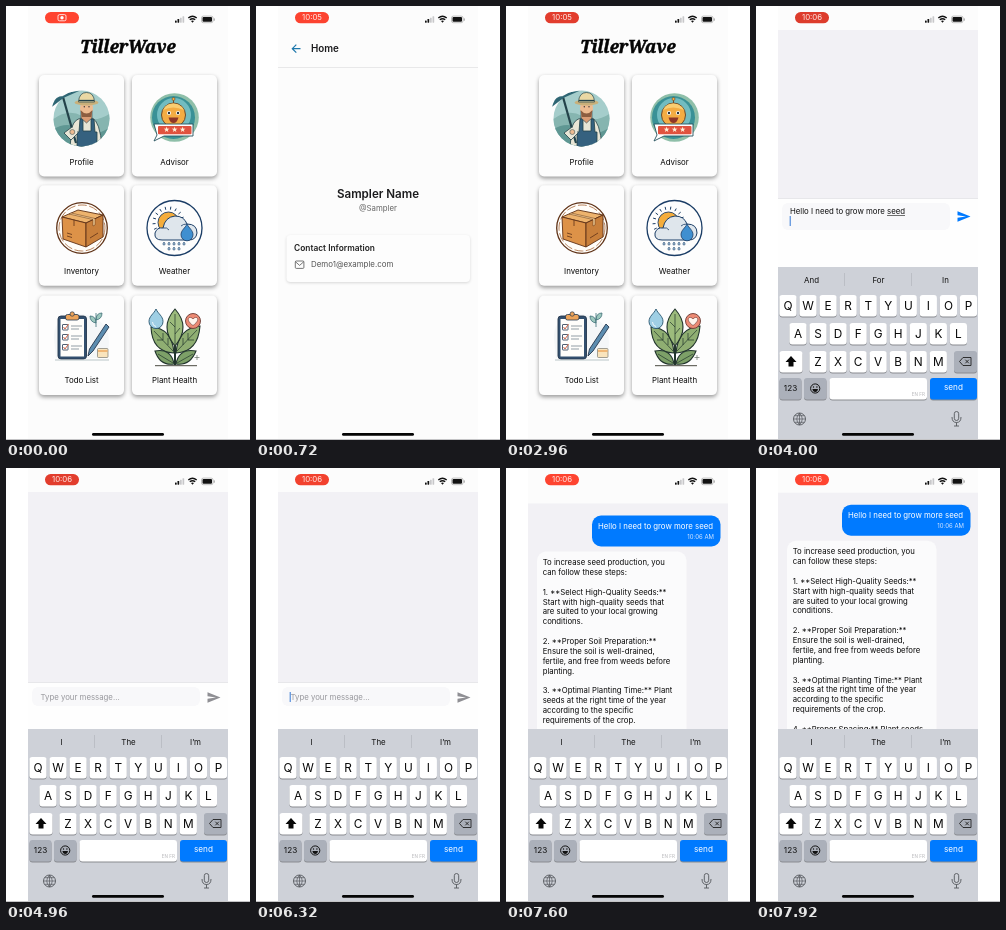
Recreate the animation shown at these times as an HTML page with a canvas. Size 244 by 434 pixels, loop 8 s.

```html
<!DOCTYPE html>
<html lang="en">
<head>
<meta charset="utf-8">
<title>Farm app demo</title>
<style>
html, body { margin: 0; width: 100%; height: 100%; overflow: hidden; background: #fff; }
canvas { display: block; width: 100vw; height: 100vh; }
</style>
</head>
<body>
<canvas id="stage"></canvas>
<script>
const W = 244, H = 434, LOOP = 8000;
const canvas = document.getElementById('stage');
const g = canvas.getContext('2d');
const SANS = 'Inter, Roboto, sans-serif';
const BLUE = '#007aff', NAVY = '#1b3d66', INK = '#22352d', DARK = '#23424a';

// Screen changes in ms
const T = { profile: 480, avatar: 960, back: 2160, press: 3440, chat: 3600, keys: 3680,
  type: 3800, typed: 3980, sent: 4720, reply: 7200, scroll: 7600, scrolled: 7920 };

const clamp = v => Math.max(0, Math.min(1, v));
const span = (t, a, b) => clamp((t - a) / (b - a));
const ease = v => v * v * (3 - 2 * v);

function paint(p, fill, stroke, lw = 1) {
  if (fill) { g.fillStyle = fill; g.fill(p); }
  if (stroke) { g.strokeStyle = stroke; g.lineWidth = lw; g.stroke(p); }
}
const path = (d, fill, stroke, lw) => paint(new Path2D(d), fill, stroke, lw);
function rect(x, y, w, h, fill) { g.fillStyle = fill; g.fillRect(x, y, w, h); }
function box(x, y, w, h, r, fill, stroke, lw) {
  const p = new Path2D();
  p.roundRect(x, y, w, h, r);
  paint(p, fill, stroke, lw);
}
function disc(x, y, r, fill, stroke, lw) {
  const p = new Path2D();
  p.arc(x, y, r, 0, 7);
  paint(p, fill, stroke, lw);
}
function oval(x, y, rx, ry, fill) {
  const p = new Path2D();
  p.ellipse(x, y, rx, ry, 0, 0, 7);
  paint(p, fill);
}
function text(s, x, y, size, color = '#111', align = 'left', weight = 400, family = SANS) {
  g.font = `${weight} ${size}px ${family}`;
  g.fillStyle = color;
  g.textAlign = align;
  g.textBaseline = 'middle';
  g.fillText(s, x, y);
}
function shadowed(blur, dy, color, draw) {
  g.save();
  const k = g.getTransform().a;
  g.shadowBlur = blur * k;
  g.shadowOffsetY = dy * k;
  g.shadowColor = color;
  draw();
  g.restore();
}

function statusBar(t) {
  const glow = 0.5 + 0.5 * Math.cos(t / LOOP * 2 * Math.PI);
  const mix = (a, b) => Math.round(a + (b - a) * glow);
  box(39, 6, 34, 11.3, 5.6, `rgb(${mix(221, 255)},${mix(60, 68)},${mix(44, 48)})`);
  if (t < T.profile) {
    box(52, 8.6, 8, 6.2, 1.5, null, '#fff', 0.8);
    disc(56, 11.7, 1.7, '#fff');
  } else {
    text(t < T.chat ? '10:05' : '10:06', 56, 12, 7.8, '#ffe9e4', 'center');
  }
  for (let i = 0; i < 4; i++) {
    box(169 + i * 2.5, 14.5 - i * 1.4, 1.7, 2.2 + i * 1.4, 0.4, i < 2 ? '#111' : '#c8c8ca');
  }
  path('M182.3 12Q186.5 8.3 190.7 12M183.8 13.8Q186.5 11.5 189.2 13.8', null, '#111', 1.4);
  path('M185 15.1Q186.5 14 188 15.1L186.5 16.7Z', '#111');
  box(195.5, 10.1, 11.5, 6.6, 1.8, null, '#999', 0.6);
  box(196.5, 11, 9.5, 4.8, 1, '#111');
  box(207.7, 12.2, 1, 2.5, 0.5, '#999');
}

function farmer() {
  g.save();
  const clip = new Path2D();
  clip.arc(75.5, 112.5, 28, 0, 7);
  g.clip(clip);
  rect(46, 83, 60, 60, '#a5cdcb');
  path('M46 114Q62 102 76 110T106 106V142H46Z', '#86b5b0');
  path('M46 124Q62 114 74 124T106 120V142H46Z', '#5f9793');
  path('M64 141L66 121Q69 112 77 112H86Q94 115 96 141Z', '#e9e6d6', DARK, 0.8);
  path('M71 141V126H73L74 113H77V125H85V113H88L89 126H91V141Z', '#35617f', DARK, 0.8);
  path('M75 105H86V112L80.5 117L75 112Z', '#d99b74', DARK, 0.6);
  oval(80.5, 102, 6.5, 7.5, '#edbb91');
  path('M74.5 104Q80.5 111 86.5 104L85 111H76Z', '#8d5d40');
  disc(78.3, 100.7, 0.7, '#333');
  disc(83, 100.7, 0.7, '#333');
  g.restore();
  oval(80.5, 96.5, 12, 3, '#c9b07a');
  path('M72.5 96Q73 86.5 80.5 86.5T88.5 96Z', '#ead8a4', DARK, 0.7);
  path('M72.8 94.5H88.2', null, DARK, 1.3);
  path('M57 91L70 137', null, DARK, 2.2);
  path('M48 98Q50 91 57 91L66 87Q60 88 48 98Z', '#2f6674', '#2f6674', 2);
  path('M66 121L58 127L65 134L72 127', '#e9e6d6', DARK, 0.8);
  disc(66.3, 126, 2.5, '#edbb91', DARK, 0.5);
}

function advisor() {
  disc(168.5, 111.5, 24.3, '#8fbfa9');
  disc(167.5, 111.5, 21.5, '#3a9196');
  disc(168, 109, 17, '#72bcc0');
  disc(167.5, 109, 12, '#f3ac43', '#6b4a2a', 1);
  path('M157 104Q160 97 167.5 97.5T178 104Q167 99 157 104', '#f9cd72');
  path('M167.5 97V93.5', null, '#6b4a2a', 1);
  disc(167.5, 93, 1.5, '#f3ac43', '#6b4a2a', 0.6);
  for (const x of [163, 172]) {
    disc(x, 107, 2, '#fff');
    disc(x, 107, 1.2, '#24333c');
  }
  path('M162.5 111.5H172.5Q171 117 167.5 117T162.5 111.5', '#8f3727');
  path('M148 118H187V130H158L148 135L151 129Z', '#fff', '#27535e', 0.9);
  box(152, 120, 33.5, 8.3, 1, '#e0523f');
  for (let i = 0; i < 3; i++) text('★', 160.5 + i * 8, 124.2, 7.5, '#fff3dc', 'center', 400, 'DejaVu Sans, sans-serif');
}

function parcel() {
  const edge = '#5f3217';
  disc(76, 222, 25.3, '#fffdf9', edge, 1.3);
  g.setLineDash([9, 2.5]);
  disc(76, 222, 23, null, '#a8673a', 0.8);
  g.setLineDash([]);
  path('M56 211L72 204L97 209L80 217Z', '#edb36d', edge, 0.9);
  path('M56 211L80 217V241L57 233Z', '#dd9248', edge, 0.9);
  path('M80 217L97 209V231L80 241Z', '#c87f3b', edge, 0.9);
  path('M65 207L89 212.5V219L87 220V213.5L63 208Z', '#f6cf95', edge, 0.5);
  path('M61 227L66 228.5M61 230L66 231.5M84 232L92 227M68 214V220', null, edge, 0.8);
}

function drop(x, y, s, fill, stroke, lw = 0.8) {
  path(`M${x} ${y}C${x + s * 0.3} ${y + s * 0.7} ${x + s} ${y + s} ${x + s} ${y + s * 1.8}A${s} ${s} 0 0 1 ${x - s} ${y + s * 1.8}C${x - s} ${y + s} ${x - s * 0.3} ${y + s * 0.7} ${x} ${y}Z`, fill, stroke, lw);
}

function weather() {
  disc(168.5, 222, 27.5, '#fdfdfd', NAVY, 1.3);
  for (let i = 0; i < 10; i++) {
    const a = 2.7 + i * 0.36, c = Math.cos(a), s = Math.sin(a);
    path(`M${162.5 + c * 13} ${216.5 + s * 13}L${162.5 + c * 16} ${216.5 + s * 16}`, null, NAVY, 1);
  }
  disc(162.5, 216.5, 10.5, '#f5ad3c', NAVY, 0.9);
  path('M156 234Q148 234 149 227Q151 221 157 222Q159 211 169 210Q178 210 181 218Q191 218 191 227Q190 234 183 234Z', '#dfe6ec', NAVY, 1);
  path('M157 222Q161 221 163 224M181 218Q177 218 175 220', null, NAVY, 0.8);
  drop(181, 218, 6, '#3f8fd0', NAVY);
  for (let i = 0; i < 8; i++) drop(158 + (i % 5) * 5 + (i > 4 ? 5 : 0), i > 4 ? 241 : 236, 1.1, '#a9cbe4', NAVY, 0.6);
}

function todo() {
  const navy = '#26384f';
  path('M48 333Q47 315 64 309Q87 304 101 323Q106 342 98 352H50Z', '#f5f7f8');
  box(52, 310, 28.5, 43, 3, '#33506f', navy, 0.9);
  rect(54.5, 313, 23.5, 37.5, '#fffefb');
  box(59.5, 308.5, 13.5, 5.5, 2, '#eda45a', navy, 0.8);
  disc(66.2, 308, 2.2, '#eda45a', navy, 0.7);
  for (let i = 0; i < 3; i++) {
    const y = 318.5 + i * 10;
    box(56.5, y, 5.5, 5.5, 0.5, '#fff', navy, 0.8);
    path(`M57.5 ${y + 2.5}L59 ${y + 4.5}L62.5 ${y - 0.5}`, null, '#cd684a', 1);
    path(`M65 ${y + 1.5}H76M65 ${y + 4.5}H73`, null, '#66747f', 0.7);
  }
  path('M100 318L103 321L87 345L82 350L83.5 343Z', '#5c8db0', navy, 0.9);
  path('M90 321V307M90 317Q84 316 84 310Q90 310 90 317M90 314Q96 313 96 307Q90 307 90 314', '#9cc7bd', '#3e6f78', 0.8);
  box(91.5, 342.5, 10.5, 9, 1, '#f9e4bd', '#7d7b72', 0.7);
  path('M92 345H101.5', null, '#eda45a', 1.4);
  path('M49 354H103', null, '#9cacaf', 0.7);
}

function leaf(d, vein, fill) {
  path(d, fill, INK, 1.1);
  path(vein, null, INK, 0.7);
}

function plant() {
  path('M169 359V323', null, INK, 2);
  leaf('M168 347Q146 346 145 321Q166 322 168 347', 'M148 325L167 345M157 334V327M162 339V332M157 334H151', '#8fae72');
  leaf('M170 347Q192 346 194 320Q172 322 170 347', 'M191 324L171 345M182 334V327M177 339V332M182 334H188', '#8fae72');
  leaf('M169 340Q153 321 169 303Q185 321 169 340', 'M169 308V339M169 321L164 316M169 328L174 322', '#9cbb7c');
  leaf('M168 358Q154 360 149 345Q165 342 168 358', 'M152 348L167 357', '#7da068');
  leaf('M170 358Q184 360 190 345Q173 342 170 358', 'M187 348L171 357', '#7da068');
  path('M149 359.7H191', null, '#4b4a40', 1);
  drop(150, 303, 7, '#9fcfe4', '#2a5670', 0.9);
  path('M146.5 316Q146.5 320 150 320.5', null, '#fff', 0.8);
  disc(187, 315, 7.5, '#ec8a74', '#6b3a34', 0.9);
  path('M187 319.5C178 313 184 309 187 313C190 309 196 313 187 319.5Z', '#fff4ec', '#6b3a34', 0.6);
  path('M191 349V354M188.5 351.5H193.5', null, '#667066', 0.7);
}

const CARDS = [['Profile', farmer], ['Advisor', advisor], ['Inventory', parcel],
  ['Weather', weather], ['Todo List', todo], ['Plant Health', plant]];

function title(s) {
  text(s, 122, 42, 17.2, '#050505', 'center', 'italic 900', '"Noto Serif", serif');
  g.strokeStyle = '#050505';
  g.lineWidth = 0.5;
  g.strokeText(s, 122, 42);
}

function home(t) {
  title('TillerWave');
  CARDS.forEach(([label, icon], i) => {
    const x = 33 + (i % 2) * 93, row = i >> 1, y = 69 + row * 110.3;
    const pressed = t >= T.press && i === 1 || t >= T.profile - 160 && t < T.profile && i === 0;
    g.globalAlpha = pressed ? 0.45 : 1;
    shadowed(4, 2, 'rgba(0,0,0,.4)', () => box(x, y, 85, 101.5 - row, 5, '#fdfdfd'));
    icon();
    text(label, x + 42.5, 156.5 + row * 109, 7.9, '#080808', 'center');
    g.globalAlpha = 1;
  });
}

function profile(t) {
  path('M44.5 42.7H36.5M40.3 38.7L36.3 42.7L40.3 46.7', null, '#1e78ac', 1.2);
  text('Home', 55, 43, 9.8, '#1c1c1e', 'left', 600);
  rect(22, 61, 200, 0.8, '#e4e4e5');
  if (t >= T.avatar) {
    path('M88 155Q85 155 85.3 151Q88 127 107 120H137Q156 127 159 151Q159 155 156 155Z', '#7b797b');
    disc(122, 107, 24.5, '#fdfdfd');
    disc(122, 107, 21.3, '#7b797b');
  }
  text('Sampler Name', 122, 188.5, 11.6, '#1b1b1d', 'center', 600);
  text('@Sampler', 122, 203, 7.8, '#666', 'center');
  shadowed(3, 1, 'rgba(0,0,0,.15)', () => box(30.5, 229, 183.5, 47, 4, '#fdfdfd'));
  text('Contact Information', 38, 242.5, 8.4, '#222', 'left', 600);
  box(39.3, 255, 8.6, 7.4, 1, null, '#555', 0.8);
  path('M39.5 255.8L43.6 259.4L47.7 255.8', null, '#555', 0.8);
  text('Demo1@example.com', 55, 259, 7.9, '#555');
}

function key(x, y, w, fill = '#fff', h = 21.5) {
  box(x, y + 1, w, h, 3, '#898b90');
  box(x, y, w, h, 3, fill);
}

function keyboard(words) {
  rect(22, 261, 200, 175, '#ced1d8');
  words.forEach((w, i) => text(w, 55.5 + i * 67, 274.5, 7.9, '#111', 'center'));
  rect(88, 267, 0.7, 13, '#b3b6bd');
  rect(155, 267, 0.7, 13, '#b3b6bd');
  ['QWERTYUIOP', 'ASDFGHJKL', 'ZXCVBNM'].forEach((row, r) => {
    const x0 = [32, 42, 62][r], y = 289 + r * 28;
    [...row].forEach((c, i) => {
      const x = x0 + i * 20.05;
      key(x - 8.6, y, 17.2);
      text(c, x, y + 11, 11.8, '#080808', 'center');
    });
  });
  const grey = '#abb0ba';
  key(23.5, 345, 23);
  path('M35 350L40.5 356H37.5V360.5H32.5V356H29.5Z', '#080808');
  key(198, 345, 23, grey);
  path('M203.5 355.5L207 351.5H215V359.5H207ZM209.3 353.7L212.9 357.3M212.9 353.7L209.3 357.3', null, '#222', 0.9);
  key(23.5, 372, 22, grey);
  text('123', 34.5, 383, 8.2, '#111', 'center');
  key(48, 372, 22.5, grey);
  disc(59.2, 382.5, 4.6, null, '#111', 1);
  disc(57.5, 381, 0.7, '#111');
  disc(60.9, 381, 0.7, '#111');
  path('M56.4 383H62Q61.5 386 59.2 386T56.4 383', '#111');
  key(73.5, 372, 97.5);
  text('EN FR', 169, 389, 4.6, '#b5b5b8', 'right');
  key(174, 372, 47, BLUE);
  text('send', 197.5, 382, 8.2, '#fff', 'center');
  disc(43.5, 413, 6, null, '#55585d', 0.9);
  path('M43.5 407Q38 413 43.5 419Q49 413 43.5 407V419M37.5 413H49.5M38.7 409.7H48.3M38.7 416.3H48.3', null, '#55585d', 0.7);
  box(198.3, 405.5, 4.4, 9, 2.2, null, '#55585d', 0.9);
  path('M196 411Q196 416.5 200.5 416.5T205 411M200.5 416.5V420M198 420H203', null, '#55585d', 0.9);
}

const QUESTION = 'Hello I need to grow more seed';
const ANSWER = ['To increase seed production, you', 'can follow these steps:', '',
  '1. **Select High-Quality Seeds:**', 'Start with high-quality seeds that', 'are suited to your local growing', 'conditions.', '',
  '2. **Proper Soil Preparation:**', 'Ensure the soil is well-drained,', 'fertile, and free from weeds before', 'planting.', '',
  '3. **Optimal Planting Time:** Plant', 'seeds at the right time of the year', 'according to the specific', 'requirements of the crop.', '',
  '4. **Proper Spacing:** Plant seeds'];

// The whole list, backdrop included, is pulled down and springs back
function messages(t) {
  const dy = -10.8 * ease(span(t, T.scroll, T.scrolled));
  g.save();
  g.beginPath();
  g.rect(22, 24, 200, 237);
  g.clip();
  rect(22, 24, 200, 14, '#fcfcfc');
  g.translate(0, dy);
  rect(22, 35.5, 200, 240, '#f2f1f5');
  box(86, 47.5, 128.5, 31, 9, BLUE);
  text(QUESTION, 92, 58.5, 7.8, '#fff');
  text('10:06 AM', 208, 69.2, 6, '#d3e6ff', 'right');
  box(31, 83.5, 149.5, 240, 9, '#fbfbfc');
  ANSWER.forEach((s, i) => text(s, 36.7, 94.8 + i * 9.86, 7.75, '#080808'));
  g.restore();
}

function inputBar(t, lift) {
  const sent = t >= T.sent;
  const typed = sent ? '' : QUESTION.slice(0, Math.round(QUESTION.length * span(t, T.type, T.typed)));
  const done = typed === QUESTION;
  const top = done ? 192 : 214;
  g.save();
  g.translate(0, lift);
  rect(22, top, 200, 261 - top, '#fefefe');
  rect(22, top, 200, 0.7, '#dedee2');
  box(26, top + 5, 168, done ? 27 : 19, 6, '#f8f8fa');
  const y = done ? 205.5 : 229.5;
  if (typed) text(typed, 34, y, 7.8);
  else text('Type your message...', 34.5, y, 7.8, '#98989d');
  const w = typed ? g.measureText(typed).width : 0;
  if (done) {
    const start = g.measureText(QUESTION.slice(0, -4)).width;
    rect(34 + start, 209.3, w - start, 0.7, '#333');
  }
  if (t % 1000 < 600) rect(done ? 33.7 : 33.7 + w, done ? 210 : 224, 1, 10, '#3478d4');
  const cy = done ? 210.5 : 229.5;
  path(`M201.5 ${cy - 5.3}L214.5 ${cy}L201.5 ${cy + 5.3}V${cy + 1.2}L210 ${cy}L201.5 ${cy - 1.2}Z`, typed ? BLUE : '#8f8f94');
  g.restore();
}

function chat(t) {
  rect(22, 24, 200, 410, '#f2f1f5');
  const lift = 161 * (1 - ease(span(t, T.keys, T.type)));
  if (t < T.reply) inputBar(t, lift);
  else messages(t);
  g.save();
  g.translate(0, lift * 1.08);
  keyboard(t >= T.typed && t < T.sent ? ['And', 'For', 'In'] : ['I', 'The', 'I’m']);
  g.restore();
}

function draw(t) {
  rect(0, 0, W, H, '#fff');
  rect(22, 0, 200, H, '#fcfcfc');
  if (t >= T.chat) chat(t);
  else if (t >= T.profile && t < T.back) profile(t);
  else home(t);
  statusBar(t);
  box(86, 427, 72, 2.8, 1.4, '#050505');
  rect(0, 433, W, 1, '#c4c4c6');
}

function resize() {
  const k = devicePixelRatio || 1;
  canvas.width = Math.round(innerWidth * k);
  canvas.height = Math.round(innerHeight * k);
}
addEventListener('resize', resize);
resize();

const began = performance.now();
function tick() {
  g.setTransform(canvas.width / W, 0, 0, canvas.height / H, 0, 0);
  draw((performance.now() - began) % LOOP);
  requestAnimationFrame(tick);
}
tick();
</script>
</body>
</html>
```
